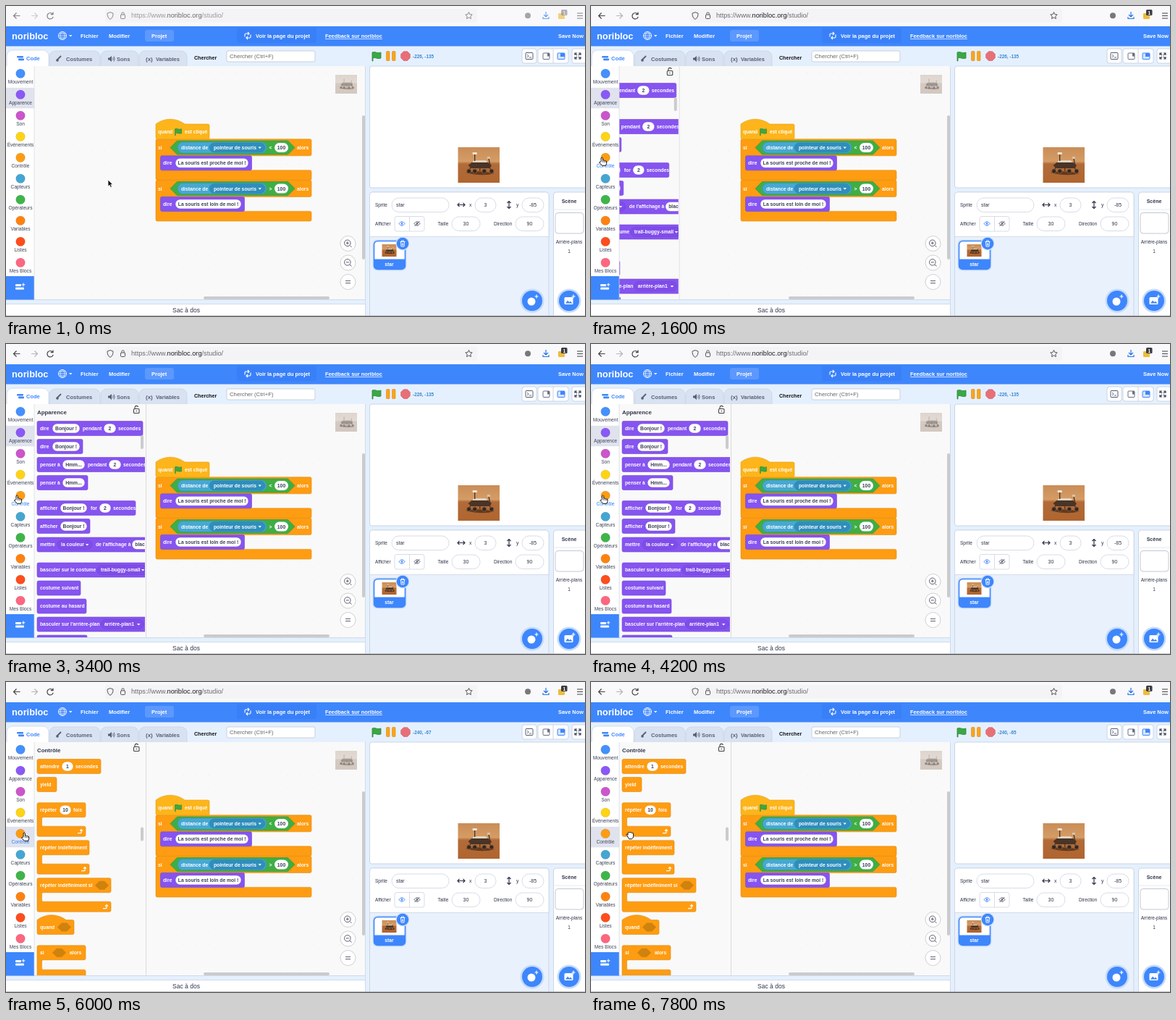
Recreate the animation shown at these times as an HTML page with a canvas. Size 800x428 px, loop 8 s.

```html
<!DOCTYPE html>
<html lang="fr">
<head>
<meta charset="utf-8">
<title>Studio de blocs</title>
<style>
html, body { margin: 0; width: 100%; height: 100%; overflow: hidden; background: #e5f0ff; }
canvas { display: block; width: 800px; height: 428px; }
</style>
</head>
<body>
<canvas id="stage"></canvas>
<script>
const canvas = document.getElementById('stage');
const ctx = canvas.getContext('2d');
const dpr = window.devicePixelRatio || 1;
canvas.width = 800 * dpr;
canvas.height = 428 * dpr;

const LOOP = 8000, STEP = 200;
const SELECT_AT = 5800, TRACK_AT = 4400, ACTIVE_AT = 400;
const FONT = '"Liberation Sans", Arial, sans-serif';
const BLUE = '#3e86fc', INK = '#30354a', WHITE = '#fff', EDGE = '#ccd5e3';
const LOOKS = '#8654f0', CONTROL = '#fe9c12', EVENT = '#fdb51b';
const DARK = { [LOOKS]: '#7243d8', [CONTROL]: '#e18c0c', [EVENT]: '#e0a010' };
const BLOCK_TEXT = 6.75;

const CATEGORIES = [
  ['Mouvement', '#4490ff'], ['Apparence', '#8a58f6'], ['Son', '#cc55cc'],
  ['Événements', '#ffd414'], ['Contrôle', CONTROL], ['Capteurs', '#45a6d3'],
  ['Opérateurs', '#3fb549'], ['Variables', '#ff8210'], ['Listes', '#ff4d1c'],
  ['Mes Blocs', '#ff6680']
];

// Block parts: "x text", or a kind (o = input, v = menu, h = condition) with "x1-x2 text"
const LOOKS_ROWS = [
  [116.5, 146, '47 dire|o64-102 Bonjour !|106 pendant|o135-152 2|155 secondes'],
  [141.5, 63, '47 dire|o64-102 Bonjour !'],
  [166.5, 157, '47 penser à|o78-109 Hmm...|113 pendant|o142-159 2|162 secondes'],
  [191.5, 70, '47 penser à|o78-109 Hmm...'],
  [226.5, 136, '47 afficher|o75-112 Bonjour !|117 for|o129-145 2|148 secondes'],
  [251.5, 73, '47 afficher|o75-112 Bonjour !'],
  [277, 161, "47 mettre|v71-119 la couleur|124 de l'affichage à|o174-200 black"],
  [312, 157, '47 basculer sur le costume|v126-196 trail-buggy-small'],
  [337, 60, '47 costume suivant'],
  [362, 68, '47 costume au hasard'],
  [387, 152, "47 basculer sur l'arrière-plan|v131-190 arrière-plan1"],
  [412, 69, '']
];

const CURSOR = [
  [0, 141, 240], [400, 141, 240], [1000, 60, 222], [1400, 15, 209.3], [4000, 15, 209.3],
  [5200, 33, 209.3], [5800, 25, 208.4], [7000, 26, 208.4], [7600, 53, 207.2], [8000, 53, 207.2]
];

const smooth = p => { p = Math.min(1, Math.max(0, p)); return p * p * (3 - 2 * p); };

function cursorAt(t) {
  const i = CURSOR.findIndex(k => k[0] > t);
  const [t0, x0, y0] = CURSOR[i - 1], [t1, x1, y1] = CURSOR[i];
  const p = smooth((t - t0) / (t1 - t0));
  return { x: x0 + (x1 - x0) * p, y: y0 + (y1 - y0) * p };
}

function rect(x, y, w, h, fill) {
  ctx.fillStyle = fill;
  ctx.fillRect(x, y, w, h);
}

function paint(path, fill, stroke, width = 1) {
  if (fill) { ctx.fillStyle = fill; ctx.fill(path); }
  if (stroke) { ctx.strokeStyle = stroke; ctx.lineWidth = width; ctx.stroke(path); }
}

const shape = (d, fill, stroke, width) => paint(new Path2D(d), fill, stroke, width);
const line = (d, color, width = 1) => shape(d, null, color, width);

function round(x, y, w, h, r, fill, stroke, width) {
  const p = new Path2D();
  p.roundRect(x, y, w, h, r);
  paint(p, fill, stroke, width);
}

function circle(x, y, r, fill, stroke, width) {
  const p = new Path2D();
  p.arc(x, y, r, 0, 7);
  paint(p, fill, stroke, width);
}

function text(s, x, y, size, color = INK, bold = false, align = 'left') {
  ctx.font = (bold ? 'bold ' : '') + size + 'px ' + FONT;
  ctx.textAlign = align;
  ctx.fillStyle = color;
  ctx.fillText(s, x, y);
  return ctx.measureText(s).width;
}

const mid = (s, x, y, size, color, bold) => text(s, x, y, size, color, bold, 'center');

function at(x, y, draw) {
  ctx.save();
  ctx.translate(x, y);
  draw();
  ctx.restore();
}

function clip(x, y, w, h, draw) {
  ctx.save();
  ctx.beginPath();
  ctx.rect(x, y, w, h);
  ctx.clip();
  draw();
  ctx.restore();
}

const caret = (x, y, color) => shape(`M${x - 2} ${y - 1}h4.4l-2.2 2.6z`, color);
const flag = (x, y, s) => at(x, y, () => {
  ctx.scale(s, s);
  shape('M-6-5c4-2 6 2 12 0v8c-5 2-8-2-11 0v4h-1z', '#39a845', '#2c8738', 0.8);
});

function stack(x, y, w, h, color, { mouth = 0, foot = 13.6, hat = 0 } = {}) {
  const r = x + w, b = y + h;
  let d = hat ? `M${x} ${y}c12-9 ${hat - 12}-9 ${hat} 0` : `M${x} ${y + 2}q0-2 2-2`;
  d += `H${r - 2}q2 0 2 2V${b - 2}q0 2-2 2`;
  if (mouth) {
    d += `H${x + 8.5}q-2 0-2 2V${b + mouth - 2}q0 2 2 2` +
         `H${r - 2}q2 0 2 2V${b + mouth + foot - 2}q0 2-2 2`;
  }
  shape(d + `H${x + 2}q-2 0-2-2z`, color, DARK[color], 0.6);
}

function hex(x1, x2, y, h, fill, stroke) {
  const k = h / 2;
  shape(`M${x1} ${y}l${k}${-k}H${x2 - k}l${k} ${k}l${-k} ${k}H${x1 + k}z`, fill, stroke, 0.7);
}

function parts(y, list, color) {
  for (const s of list.split('|')) {
    const m = s.match(/^([ovh]?)([\d.]+)(?:-([\d.]+))? ?(.*)$/);
    if (!m) continue;
    const [, kind, x1, x2, label] = m, a = +x1, b = +x2, base = y + 2.4;
    if (kind === 'o') {
      round(a, y - 6.5, b - a, 13, 6.5, WHITE, DARK[color], 0.5);
      mid(label, (a + b) / 2, base, BLOCK_TEXT, '#3c4057', true);
    } else if (kind === 'v') {
      round(a, y - 6.5, b - a, 13, 6.5, '#7f4de8', DARK[color], 0.6);
      text(label, a + 5, base, BLOCK_TEXT, WHITE, true);
      caret(b - 7, y, WHITE);
    } else if (kind === 'h') {
      hex(a, b, y, 12, '#cf820e');
    } else {
      text(label, a, base, BLOCK_TEXT, WHITE, true);
    }
  }
}

function photo(x, y, w, h, faded) {
  ctx.save();
  if (faded) {
    ctx.globalAlpha = 0.35;
    ctx.filter = 'grayscale(0.6)';
  }
  ctx.translate(x, y);
  ctx.scale(w / 57, h / 49);
  const g = ctx.createLinearGradient(0, 0, 0, 49);
  g.addColorStop(0, '#c98d58');
  g.addColorStop(0.4, '#d59c66');
  g.addColorStop(0.47, '#b16b39');
  g.addColorStop(1, '#b0652f');
  rect(0, 0, 57, 49, g);
  shape('M10 35q18-4 40 1q-16 5-40-1z', '#65381c');
  shape('M14 25l6-5h20l6 5-2 4H18z', '#4a3426');
  shape('M19 21l3-3h16l3 3z', '#e2d3bf');
  line('M23 19V9M44 25l-2-10M18 26l-3 7M30 26v7M42 26l4 7', '#4a3426', 1.3);
  rect(20, 7, 6, 3, '#f0e5d5');
  rect(40, 13, 4, 3, '#d8c4a8');
  for (const wx of [15, 23, 36, 46]) circle(wx, 33, 3, '#35271f', '#8d6a4d', 0.7);
  ctx.restore();
}

function browser(active) {
  rect(0, 0, 800, 28, '#f9f9fb');
  round(137, 4, 514, 19, 3, '#f4f4f7');
  ctx.save();
  ctx.globalAlpha = active ? 1 : 0.65;
  line('M19.5 13.5H11M14.5 9.5l-4 4 4 4', '#444', 1.2);
  line('M35 13.5h8M39.5 9.5l4 4-4 4', '#b5b5b9', 1.2);
  line('M64.5 11.2a4.2 4.2 0 1 0 .7 3.6M65 8.5v3.2h-3.2', '#444', 1.2);
  line('M144 8.6l4 1.5c0 4-1 6.5-4 8.3-3-1.8-4-4.3-4-8.3z', '#555');
  round(158.5, 12, 6, 5.5, 1, null, '#555');
  line('M159.8 12v-1.5a1.7 1.7 0 0 1 3.4 0V12', '#555');
  let x = 173;
  for (const [s, c] of [['https://www.', '#6a6a70'], ['noribloc.org', '#1c1b22'], ['/studio/', '#6a6a70']])
    x += text(s, x, 16.4, 9.2, c);
  line('M639.5 8.5l1.4 3 3.3.4-2.4 2.3.6 3.3-2.9-1.6-2.9 1.6.6-3.3-2.4-2.3 3.3-.4z', '#555');
  circle(721, 13.3, 4, '#77777c');
  line('M746 8v6.5M743 12l3 3 3-3M742 15v2.5h8V15', '#2676e8', 1.2);
  round(763, 10, 9, 8, 1, '#eebc3b');
  round(767, 5, 8.5, 8, 1.5, active ? '#3c3c44' : '#8b8b90');
  mid('1', 771.2, 11.5, 6.5, WHITE, true);
  line('M789 10h8M789 13.5h8M789 17h8', '#444', 1.1);
  ctx.restore();
}

function header() {
  rect(0, 28, 800, 27.5, BLUE);
  text('noribloc', 8, 45.5, 12.8, WHITE, true);
  circle(78, 41, 5.5, null, WHITE, 0.9);
  line('M72.5 41h11M78 35.5c-4 3-4 8 0 11c4-3 4-8 0-11M73.5 38h9M73.5 44h9', WHITE, 0.7);
  caret(89, 41, WHITE);
  text('Fichier', 103, 43.6, 7.5, WHITE, true);
  text('Modifier', 142, 43.6, 7.5, WHITE, true);
  round(192, 33, 40, 16, 3, '#5c98fd');
  text('Projet', 201, 43.6, 7.5, WHITE, true);
  round(319, 30, 110, 21, 3, '#3980f8');
  line('M330 42.5v-3q0-1.500 1.500-1.500h4M334 36l2 2-2 2M338 39.5v3q0 1.500-1.500 1.500h-4M334 42l-2 2 2 2', WHITE, 1.1);
  text('Voir la page du projet', 345, 43.6, 7.4, WHITE, true);
  const w = text('Feedback sur noribloc', 441, 43.6, 7.4, WHITE, true);
  rect(441, 45, w, 0.7, WHITE);
  text('Save Now', 763, 43.6, 7.4, WHITE, true);
}

function tabs() {
  const tab = (x, w, label, tx, on) => {
    round(x, on ? 61 : 62, w, 26, [8, 8, 0, 0], on ? WHITE : '#d8e2f1', '#c6d1e2', 0.7);
    text(label, tx, on ? 74.8 : 75.6, 7.5, on ? BLUE : '#595f75', true);
  };
  tab(184, 66, 'Variables', 207, false);
  tab(131, 52, 'Sons', 153, false);
  tab(60, 70, 'Costumes', 83, false);
  tab(1, 58, 'Code', 28, true);
  round(15, 69, 9, 2.6, 1, BLUE);
  round(17, 72.6, 8, 2.6, 1, BLUE);
  line('M70 75l6-6', '#595f75', 1.8);
  circle(71, 75, 1.8, '#595f75');
  shape('M141 71.5h2l3-2.5v8l-3-2.5h-2z', '#595f75');
  line('M147.5 71q1.500 2 0 4M149 69.5q2.500 3.500 0 7', '#595f75', 0.9);
  text('(x)', 193, 75.5, 8, '#595f75', true);
  text('Chercher', 260, 73.5, 7.1, '#111', true);
  round(305, 62, 122, 15, 2, WHITE, '#bfc6d2', 0.8);
  text('Chercher (Ctrl+F)', 309, 72.3, 7.75, '#666');
}

function condition(y, sign, message, width) {
  stack(207, y, 215, 23, CONTROL, { mouth: 20 });
  const c = y + 11.7;
  parts(c, '210 si|402 alors', CONTROL);
  hex(227, 399, c, 19, '#3fae45', '#359a3d');
  round(237, c - 7.5, 123, 15, 7.5, '#47a8d3', '#3594c0', 0.6);
  round(281, c - 6.5, 77, 13, 6.5, '#2f8ebc', '#2a82ae', 0.5);
  text('distance de', 242, c + 2.4, BLOCK_TEXT, WHITE, true);
  text('pointeur de souris', 287, c + 2.4, BLOCK_TEXT, WHITE, true);
  caret(350.5, c, WHITE);
  mid(sign, 365.5, c + 2.4, BLOCK_TEXT, WHITE, true);
  round(371, c - 6.5, 19, 13, 6.5, WHITE);
  mid('100', 380.5, c + 2.4, BLOCK_TEXT, '#3c4057', true);
  stack(213.5, y + 23, width, 20, LOOKS);
  parts(y + 33, `217 dire|o234-${209 + width} ${message}`, LOOKS);
}

function zoomButton(y, icon) {
  circle(472.5, y, 10.5, WHITE, '#d0d0d5');
  if (icon === '=') return line(`M469 ${y - 1.5}h7M469 ${y + 1.5}h7`, '#5a5f6e', 1.2);
  circle(471.8, y - 0.7, 4.3, null, '#5a5f6e');
  line(`M475 ${y + 2.5}l2.5 2.5M469.8 ${y - 0.7}h4` + (icon === '+' ? `M471.8 ${y - 2.7}v4` : ''), '#5a5f6e');
}

function workspace() {
  rect(0, 83, 496, 322, '#f9f9f9');
  for (let x = 46; x < 494; x += 18)
    for (let y = 92; y < 402; y += 18) rect(x, y, 1, 1, '#ededed');
  photo(455, 95, 30, 26, true);
  condition(183.8, '<', 'La souris est proche de moi !', 126);
  condition(240.4, '>', 'La souris est loin de moi !', 116);
  stack(207, 163, 74, 20.8, EVENT, { hat: 40 });
  parts(174, '210 quand|247 est cliqué', EVENT);
  flag(238, 173.5, 0.75);
  zoomButton(328, '+');
  zoomButton(354.5, '-');
  zoomButton(381, '=');
  round(492, 151, 4, 199, 2, '#cbcbcd');
  round(273, 401, 174, 4, 2, '#cbcbcd');
  rect(0, 405, 496, 7, '#e5f0ff');
  rect(0, 412, 496, 16, WHITE);
  line('M0 405.5H496M0 411.5H496M496.5 83V428', EDGE, 0.8);
  mid('Sac à dos', 249, 422.7, 8.5);
}

function looksPalette() {
  text('Apparence', 43, 96.5, 7.9, INK, true);
  for (const [y, w, list] of LOOKS_ROWS) {
    stack(43, y - 10, w, 20, LOOKS);
    parts(y, list, LOOKS);
  }
}

function controlPalette() {
  const row = (y, w, list, mouth, arrow) => {
    stack(43, y - 10, w, 20, CONTROL, { mouth, foot: 14 });
    parts(y, list, CONTROL);
    if (arrow) at(43 + w - 8, y + 30, () => line('M-3 2h4q1 0 1-1v-4M0-1l2-2 2 2', WHITE, 1.2));
  };
  text('Contrôle', 43, 96.5, 7.9, INK, true);
  row(116.5, 88, '47 attendre|o77-93 1|96 secondes', 0);
  row(141.5, 27, '47 yield', 0);
  row(176.7, 67, '47 répéter|o74-90 10|93 fois', 12.5, true);
  row(228.7, 72, '47 répéter indéfiniment', 12.5, true);
  row(280.7, 102, '47 répéter indéfiniment si|h123-142', 12.5, true);
  stack(43, 328.5, 51, 20, CONTROL, { hat: 40 });
  parts(338.5, '47 quand|h71-90', CONTROL);
  row(373.7, 67, '47 si|h64-83|88 alors', 13.5);
}

function flyout(t, control) {
  const shift = -154 * (1 - smooth((t - 1390) / 400));
  if (shift <= -153) return;
  clip(39, 83, 155 + shift, 322, () => at(shift, 0, () => {
    rect(39, 83, 154.5, 322, '#f9f9f9');
    clip(39, 83, 153, 322, control ? controlPalette : looksPalette);
    rect(193, 83, 0.8, 322, '#d3d3d6');
    round(186, control ? 200.5 : 126, 4, 19, 2, '#cbcbcd');
    round(176.5, 89.5, 7.5, 6, 1, null, '#444', 1.1);
    line('M178 89.5v-2a2.3 2.3 0 0 1 4.5-.5', '#444', 1.1);
    circle(180.2, 92.5, 0.8, '#444');
  }));
}

function toolbox(control, hover) {
  rect(0, 83, 39, 322, WHITE);
  const selected = control ? 4 : 1;
  CATEGORIES.forEach(([name, color], i) => {
    const y = 93.3 + i * 29;
    if (i === selected) rect(0, y - 9.5, 39, 28.5, '#e0e3ee');
    circle(20, y, 6.3, color, 'rgba(0,0,0,.15)', 0.6);
    mid(name, 20, y + 13.7, 6.6, i === 4 && hover ? '#2b7ff5' : '#3d4358');
  });
  rect(0, 373, 39, 32.5, BLUE);
  round(13, 384, 8, 3, 1, WHITE);
  round(13, 388.5, 12, 3, 1, WHITE);
  line('M24 382.5v4.500M21.800 384.700h4.500', WHITE, 1.1);
  line('M39 83V405', '#d3d7e0', 0.7);
}

function stageArea(coords) {
  flag(512, 69, 1);
  for (const x of [525.5, 533.5]) round(x, 62.5, 4.5, 13, 1, '#fba51b', '#d98609', 0.6);
  shape('M549.4 62.8h5.2l3.7 3.7v5.2l-3.7 3.7h-5.2l-3.7-3.7v-5.2z', '#e77076', '#d9626b', 0.7);
  text(coords, 562, 71.5, 6.4, '#398bd0', true);
  round(713, 59, 20, 20, 3, WHITE, EDGE);
  round(718, 64.5, 10, 9, 1, null, '#555b70');
  line('M720 67l2 2-2 2M723 71h3', '#555b70', 0.9);
  round(735, 59, 42, 20, 3, WHITE, EDGE);
  line('M756 59v20', EDGE);
  round(742, 65, 9, 8.5, 1, null, '#6a7083');
  rect(748, 65, 3, 4.5, '#6a7083');
  round(762, 65, 10, 8.5, 1, '#d5e5ff', BLUE);
  rect(766, 65, 6, 5, BLUE);
  round(782, 59, 24, 20, 3, WHITE, EDGE);
  line('M786 68v-3h3M791 65h3v3M794 70v3h-3M789 73h-3v-3M786 65l3 3M794 65l-3 3M794 73l-3-3M786 73l3-3', '#444a5e', 1.2);
  round(502.5, 83, 304, 168, 3, WHITE, EDGE);
  photo(624.5, 195, 57.5, 49);
}

function field(x, w, y, value, left) {
  round(x, y - 10, w, 19.5, 9.7, WHITE, '#d3d9e5', 0.9);
  if (left) text(value, x + 6, y + 2.3, 7);
  else mid(value, x + w / 2, y + 2.3, 7);
}

function eye(x, y, color) {
  line(`M${x - 4} ${y}q4-5.5 8 0q-4 5.5-8 0`, color);
  circle(x, y, 1.3, color);
}

function addButton(x, icon) {
  circle(x, 407, 16.5, '#c5dbfc');
  circle(x, 407, 14, BLUE);
  icon();
  line(`M${x + 6} 398.5v5M${x + 3.5} 401h5`, WHITE, 1.2);
}

function spritePanel() {
  round(502.5, 257, 247.5, 180, 4, '#e9f1fc', EDGE);
  round(502.5, 257, 247.5, 61.5, [4, 4, 0, 0], WHITE, EDGE, 0.8);
  text('Sprite', 510, 277, 6.5);
  field(533, 79, 275, 'star', true);
  line('M624.5 274.5h9M626.5 272l-2.5 2.5 2.5 2.5M631.5 272l2.5 2.5-2.5 2.5', INK, 1.2);
  text('x', 640, 277, 6.8);
  field(648, 29, 275, '3');
  line('M695 270v9M692.5 272l2.5-2.5 2.5 2.5M692.5 277l2.5 2.5 2.5-2.5', INK, 1.2);
  text('y', 705, 277, 6.8);
  field(713, 30, 275, '-85');
  text('Afficher', 510, 303, 6.4);
  round(537, 290.5, 41, 20.5, 3, WHITE, '#d3d9e5', 0.9);
  line('M557.5 290.5v20.5', '#d3d9e5', 0.9);
  eye(547, 300.5, BLUE);
  eye(568, 300.5, '#5a6074');
  line('M564.5 304l7-7', '#5a6074');
  text('Taille', 596.5, 303, 6.5);
  field(616, 39, 301, '30');
  text('Direction', 674, 303, 6.4);
  field(704, 39, 301, '90');

  round(506.5, 322.5, 47, 43, 6, '#d0e1fb');
  round(508.5, 324.5, 43, 39, 5, WHITE, BLUE, 1.6);
  round(508.5, 349.5, 43, 14, [0, 0, 5, 5], BLUE);
  photo(519.5, 329, 20, 17);
  mid('star', 529.5, 358.5, 6.7, WHITE, true);
  circle(548, 328, 9.5, '#d0e1fb');
  circle(548, 328, 8.3, BLUE);
  line('M544.5 325.5h7M546.5 325.5v-1.5h3v1.5M545.5 326l.5 6h4l.5-6M547.3 327.5v3M548.7 327.5v3', WHITE, 0.9);
}

function backdropPanel() {
  round(756.5, 257, 50, 180, 4, WHITE, EDGE);
  mid('Scène', 778, 272, 7, INK, true);
  line('M757 281H800', '#dde4ef', 0.8);
  round(759, 285.5, 39, 28.5, 4, WHITE, '#c3c9d3');
  mid('Arrière-plans', 778, 328.3, 6.4);
  mid('1', 778, 341.3, 6.5);
  addButton(727, () => circle(726, 408, 5.5, WHITE));
  addButton(778, () => {
    round(771.5, 402, 12, 10, 1.5, WHITE);
    shape('M773 410.5l3-4 2.5 2.5 1.5-1.5 2.5 3z', BLUE);
  });
}

function pointer(x, y, kind) {
  at(x, y, () => {
    ctx.lineJoin = 'round';
    if (kind === 'arrow')
      return shape('M0 0v9l2.1-1.8 1.5 3.2 1.7-.8-1.5-3.1h2.7z', '#111', WHITE, 0.7);
    if (kind === 'grab')
      return shape('M-3 5c-2-2-1-3 1-1v-3q1-2 2 0q1-2 2 0q1-1.5 2 .5q1.5-1 1.5 1v3q0 3-2 4h-4z', WHITE, '#111', 1);
    shape('M-1 5V.5q1.2-1.7 2.3 0V4q1.2-1 2 .3q1.2-.7 1.8.5q1.4-.5 1.5 1v2.5l-1.2 2.7h-5L-3.5 7q0-1.8 1.6-.7z', WHITE, '#111', 1);
    line('M1.3 4.5v2M3.3 5v1.7M5 5.3v1.5', '#111', 0.7);
  });
}

function draw(t) {
  const { x, y } = cursorAt(t);
  const control = t >= SELECT_AT, inToolbox = x < 39;
  const coords = t < TRACK_AT ? '-226, -135' : '-240, ' + Math.round((167 - y) / 0.619);
  ctx.setTransform(dpr, 0, 0, dpr, 0, 0);
  rect(0, 0, 800, 428, '#e5f0ff');
  browser(t >= ACTIVE_AT);
  header();
  tabs();
  workspace();
  flyout(t, control);
  toolbox(control, inToolbox);
  stageArea(coords);
  spritePanel();
  backdropPanel();
  rect(0, 427.3, 800, 0.7, '#a9acb3');
  pointer(x, y, inToolbox ? 'hand' : control ? 'grab' : 'arrow');
}

const start = performance.now();
let shown = -1;
function tick() {
  const t = Math.floor(((performance.now() - start) % LOOP) / STEP) * STEP;
  if (t !== shown) draw(shown = t);
  requestAnimationFrame(tick);
}
tick();
</script>
</body>
</html>
```
